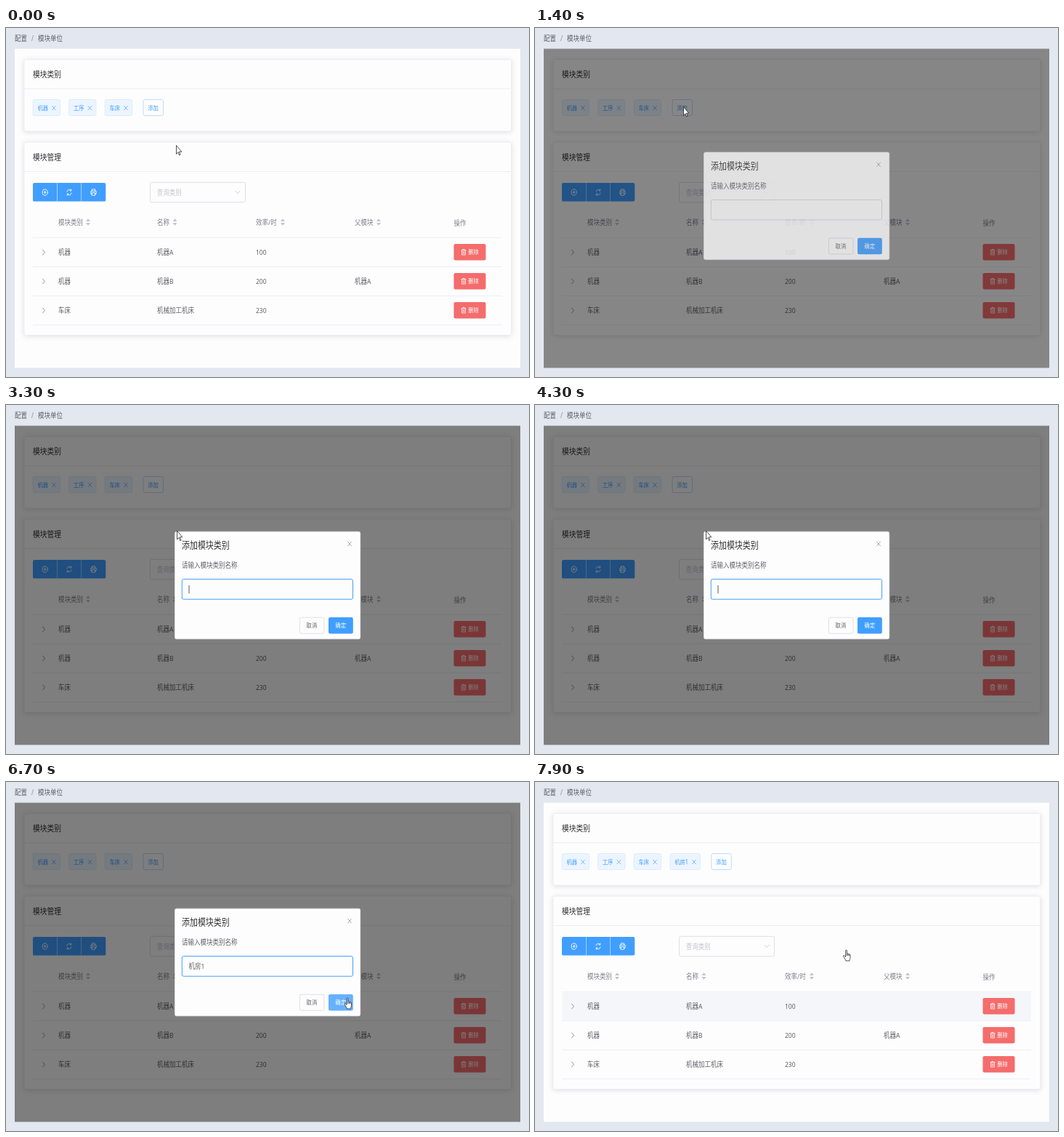
Recreate the animation shown at these times as an HTML page. Size 720x480 px, loop 8 s.

```html
<!DOCTYPE html>
<html lang="zh-CN">
<head>
<meta charset="utf-8">
<title>模块单位</title>
<style>
  html, body { margin: 0; width: 100%; height: 100%; overflow: hidden; background: #e2e7f0; }
  svg { display: block; width: 720px; height: 480px; }
  text { font-family: "Noto Sans", "Noto Sans CJK SC", "Noto Sans CJK", sans-serif; white-space: pre; }
  .card { fill: #fefdfe; stroke: #ebeef5; filter: drop-shadow(0 1.4px 3.8px rgba(0, 0, 0, .12)); }
  .icon { fill: none; stroke-linecap: round; stroke-linejoin: round; }
</style>
</head>
<body>
<svg id="stage" viewBox="0 0 720 480" xmlns="http://www.w3.org/2000/svg"></svg>
<script>
const LOOP = 8000, STEP = 100;
const SX = 0.608, SY = 0.7;
const BLUE = '#409eff', RED = '#f56c6c', DARK = '#303133', BODY = '#606266',
      MUTED = '#7f8289', FAINT = '#c0c4cc', LINE = '#ebeef5', PAPER = '#fefdfe';

const squeeze = (x, y) => `translate(${x} ${y}) scale(${SX} ${SY})`;

const text = (x, y, size, fill, str, extra = '') =>
  `<text transform="${squeeze(x, y)}" y="${size * 0.38}" font-size="${size}" fill="${fill}" ${extra}>${str}</text>`;

const rect = (x, y, w, h, fill, stroke = 'none', extra = '') =>
  `<rect x="${x}" y="${y}" width="${w}" height="${h}" rx="2.2" fill="${fill}" stroke="${stroke}" ${extra}/>`;

const icon = (x, y, d, color, width = 1.4) =>
  `<path class="icon" transform="${squeeze(x, y)}" d="${d}" stroke="${color}" stroke-width="${width}"/>`;

const hline = (x1, x2, y) => `<path d="M${x1} ${y}H${x2}" stroke="${LINE}"/>`;

const ICONS = {
  cross: 'M-4 -4L4 4M4 -4L-4 4',
  right: 'M-2.5 -5L2.5 0L-2.5 5',
  down: 'M-5 -2.5L0 2.5L5 -2.5',
  plus: 'M6 0A6 6 0 1 1 -6 0A6 6 0 1 1 6 0M-2.5 0H2.5M0 -2.5V2.5',
  refresh: 'M-5 -1.5A5.2 5.2 0 0 1 4 -3.5M4.5 -6V-3H1.5M5 1.5A5.2 5.2 0 0 1 -4 3.5M-4.5 6V3H-1.5',
  print: 'M-3.5 -2.5V-6H3.5V-2.5M-3.5 3H-6V-2.5H6V3H3.5M-3.5 1H3.5V6H-3.5Z',
  trash: 'M-5 -3.5H5M-2 -3.5V-5.5H2V-3.5M-4 -3.5V5.5H4V-3.5M-1.4 -.8V3M1.4 -.8V3'
};

const tag = (x, w, label, id = '') =>
  `<g ${id && `id="${id}"`}>` +
  rect(x, 98.5, w, 22, '#ecf5ff', '#d9ecff') +
  text(x + 6.2, 110, 12, BLUE, label) +
  icon(x + w - 8.5, 110, ICONS.cross, BLUE, 1) + '</g>';

const sorter = x =>
  `<path fill="${FAINT}" d="M${x - 3} 266L${x} 262.3L${x + 3} 266ZM${x - 3} 268L${x} 271.7L${x + 3} 268Z"/>`;

const COLS = [72, 208, 344, 480];
const HEADS = [['模块类别', 113], ['名称', 232.5], ['效率/时', 381], ['父模块', 513]];
const ROWS = [
  ['机器', '机器A', '100', ''],
  ['机器', '机器B', '200', '机器A'],
  ['车床', '机械加工机床', '230', '']
];

const row = (cells, i) => {
  const y = 308.5 + i * 40;
  return icon(52, y, ICONS.right, '#73767d', 1.2) +
    cells.map((c, k) => c && text(COLS[k], y, 14, BODY, c)).join('') +
    rect(616.5, y - 11.5, 44, 22.5, RED) +
    icon(630, y - 0.3, ICONS.trash, '#fff', 1.2) +
    text(636.3, y - 0.3, 12, '#fff', '删除') +
    hline(37, 683, y + 19.9);
};

const page = () =>
  `<rect x="12" y="28.5" width="696" height="439" fill="${PAPER}"/>` +
  text(12, 14, 14, BODY, '配置') +
  text(34.8, 14, 14, '#a9adb5', '/', 'font-weight="700"') +
  text(44, 14, 14, BODY, '模块单位') +

  rect(25, 43.5, 670.5, 98.5, PAPER, LINE, 'class="card"') +
  text(37, 64, 16, DARK, '模块类别') + hline(25, 695, 83.7) +
  tag(37.2, 37.2, '机器') + tag(86.7, 37.2, '工序') + tag(136.3, 37.2, '车床') +
  tag(186, 41.5, '机房1', 'newTag') +
  '<g id="addBtn">' + rect(189, 98.5, 27.5, 22, PAPER, '#bcdcff', 'id="addBox"') +
  text(195.3, 110, 12, BLUE, '添加') + '</g>' +
  '<g id="loading">' + rect(25, 43.5, 670.5, 98.5, '#fff', 'none', 'fill-opacity=".9"') +
  `<g transform="${squeeze(360, 93)}"><circle id="spinner" r="16.8" fill="none" stroke="${BLUE}" stroke-width="1.7" stroke-linecap="round"/></g></g>` +

  rect(25, 157, 670.5, 265.5, PAPER, LINE, 'class="card"') +
  text(37, 178, 16, DARK, '模块管理') + hline(25, 695, 197.5) +
  rect(37, 213, 100.3, 25.6, BLUE) +
  '<path d="M70.5 213V238.6M103.6 213V238.6" stroke="#fff" stroke-opacity=".5"/>' +
  icon(53.8, 226, ICONS.plus, '#fff') + icon(87, 226, ICONS.refresh, '#fff') + icon(120.5, 226, ICONS.print, '#fff') +
  rect(198.5, 212.3, 131, 27.5, PAPER, '#dcdfe6') +
  text(207.8, 226, 14, FAINT, '查询类别') + icon(319, 226, ICONS.down, FAINT, 1.2) +
  HEADS.map(([label, x], i) => text(COLS[i], 267, 14, MUTED, label) + sorter(x)).join('') +
  text(616.5, 268, 14, MUTED, '操作') + hline(37, 683, 288.4) +
  '<rect id="rowHover" x="37" y="288.5" width="646" height="39.5" fill="#f4f6fa"/>' +
  ROWS.map(row).join('');

const dialog = () =>
  '<g id="dialog">' +
  rect(232.5, 174.2, 255.2, 147.6, PAPER, LINE, 'stroke-width=".7"') +
  text(242, 192, 18, DARK, '添加模块类别') +
  icon(473, 191, ICONS.cross, '#909399', 1.2) +
  text(242, 220.5, 14, BODY, '请输入模块类别名称') +
  rect(242.3, 239.6, 235.2, 27.6, PAPER, BLUE, 'id="field"') +
  text(251.5, 253.5, 14, BODY, '', 'id="typed"') +
  '<path id="caret" d="M0 248V259.2" stroke="#303133" stroke-width=".8"/>' +
  rect(404.4, 292.2, 33.6, 22, PAPER, '#dcdfe6') + text(413.6, 303.2, 12, BODY, '取消') +
  rect(444, 292, 33.8, 22.4, BLUE, 'none', 'id="okBox"') + text(453.6, 303.2, 12, '#fff', '确定') +
  '</g>';

const pointer = () =>
  '<g id="pointer" stroke="#222" stroke-width="1.2" stroke-linejoin="round" fill="#fff">' +
  '<path id="arrow" d="M0 0V17L4 13.3L6.7 19.3L9.2 18.2L6.5 12.4H12Z"/>' +
  '<path id="hand" transform="translate(-7.5 -.5)" d="M6 1.8c0-1.6 3-1.6 3 0V8c.8-1 2.5-.6 2.7.5c.9-.7 2.2-.3 2.5.8c1-.6 2.3 0 2.3 1.2V15c0 3-1.5 4-1.5 6.8H6.5C6 19 3 16.5 1 13c-.8-1.6 1-2.4 2.2-1.2L6 14.2Z' +
  'M9 8V12M11.7 8.8V12M14.2 9.5V12"/></g>';

const stage = document.getElementById('stage');
stage.innerHTML = page() +
  '<rect id="shade" x="12" y="28.5" width="696" height="439" fill="#000"/>' + dialog() + pointer();

const ui = {};
stage.querySelectorAll('[id]').forEach(el => { ui[el.id] = el; });

const clamp = v => Math.min(1, Math.max(0, v));
const mix = (a, b, p) => a + (b - a) * p;
const within = (t, a, b) => t >= a && t < b;
const smooth = p => p * p * (3 - 2 * p);
const show = (el, on) => el.setAttribute('visibility', on ? 'inherit' : 'hidden');

// CSS "ease": cubic-bezier(.25, .1, .25, 1)
function ease(p) {
  let lo = 0, hi = 1;
  const curve = (s, a, b) => 3 * a * s * (1 - s) ** 2 + 3 * b * s * s * (1 - s) + s ** 3;
  for (let i = 0; i < 20; i++) {
    const mid = (lo + hi) / 2;
    if (curve(mid, 0.25, 0.25) < p) lo = mid; else hi = mid;
  }
  return curve(lo, 0.1, 1);
}
const fade = (t, start, length) => ease(clamp((t - start) / length));

const OPEN = 1260, CLOSE = 7015, LOAD = 7030, LOADED = 7560;

// time, x, y of the pointer tip
const PATH = [
  [0, 234.5, 161.5], [100, 234.5, 161.5], [900, 204.5, 108.5], [1500, 204.5, 108.5],
  [2200, 235.5, 173], [5700, 235.5, 173], [6600, 470, 297],
  [7600, 470, 297], [7900, 428.5, 231], [LOOP, 428.5, 231]
];

function pointerAt(t) {
  const i = PATH.findIndex((p, k) => k && t <= p[0]);
  const [t0, x0, y0] = PATH[i - 1], [t1, x1, y1] = PATH[i];
  const p = smooth((t - t0) / (t1 - t0));
  return [mix(x0, x1, p), mix(y0, y1, p)];
}

function caretOn(t) {
  if (within(t, 5000, 6000)) return true;
  return within(t, 1900, 6900) && Math.floor((t - 1900) / 500) % 2 === 0;
}

function drawSpinner(t) {
  const age = Math.max(0, t - LOAD), p = (age % 1500) / 1500;
  const grow = smooth(clamp(p * 2)), chase = smooth(clamp(p * 2 - 1));
  ui.spinner.setAttribute('transform', `rotate(${age * 0.18})`);
  ui.spinner.setAttribute('stroke-dasharray', `${mix(0.8, 76, grow)} 168`);
  ui.spinner.setAttribute('stroke-dashoffset', -34 * grow - 67 * chase);
}

function render(t) {
  const closing = t >= CLOSE;
  const shade = closing ? 1 - fade(t, CLOSE, 200) : fade(t, OPEN, 200);
  const pop = closing ? 1 - fade(t, CLOSE, 300) : fade(t, OPEN, 300);
  ui.shade.setAttribute('opacity', shade * 0.5);
  ui.dialog.setAttribute('opacity', pop);
  ui.dialog.setAttribute('transform', `translate(0 ${-14 * (1 - pop)})`);
  ui.field.setAttribute('stroke', within(t, 1500, 6900) ? BLUE : '#d3d6dd');

  const typed = t < 5000 ? '' : t < 5500 ? '机房' : '机房1';
  ui.typed.textContent = typed;
  show(ui.caret, caretOn(t));
  const advance = typed ? ui.typed.getComputedTextLength() * SX : 0;
  ui.caret.setAttribute('transform', `translate(${252 + advance} 0)`);
  ui.okBox.setAttribute('fill', within(t, 6600, 6900) ? '#66b1ff' : BLUE);

  const added = t >= LOADED;
  show(ui.newTag, added);
  ui.addBtn.setAttribute('transform', `translate(${added ? 53.8 : 0} 0)`);
  ui.addBox.setAttribute('fill', within(t, 900, OPEN) ? '#ecf5ff' : PAPER);
  ui.loading.setAttribute('opacity', fade(t, LOAD, 300) - fade(t, LOADED, 300));
  drawSpinner(t);
  ui.rowHover.setAttribute('opacity', fade(t, CLOSE + 300, 250));

  const [x, y] = pointerAt(t);
  const hand = within(t, 900, OPEN) || t >= 6600;
  ui.pointer.setAttribute('transform', squeeze(x, y));
  show(ui.hand, hand);
  show(ui.arrow, !hand);
}

const began = performance.now();
function tick() {
  const t = (performance.now() - began) % LOOP;
  render(Math.floor(t / STEP) * STEP);
  requestAnimationFrame(tick);
}
tick();
</script>
</body>
</html>
```
